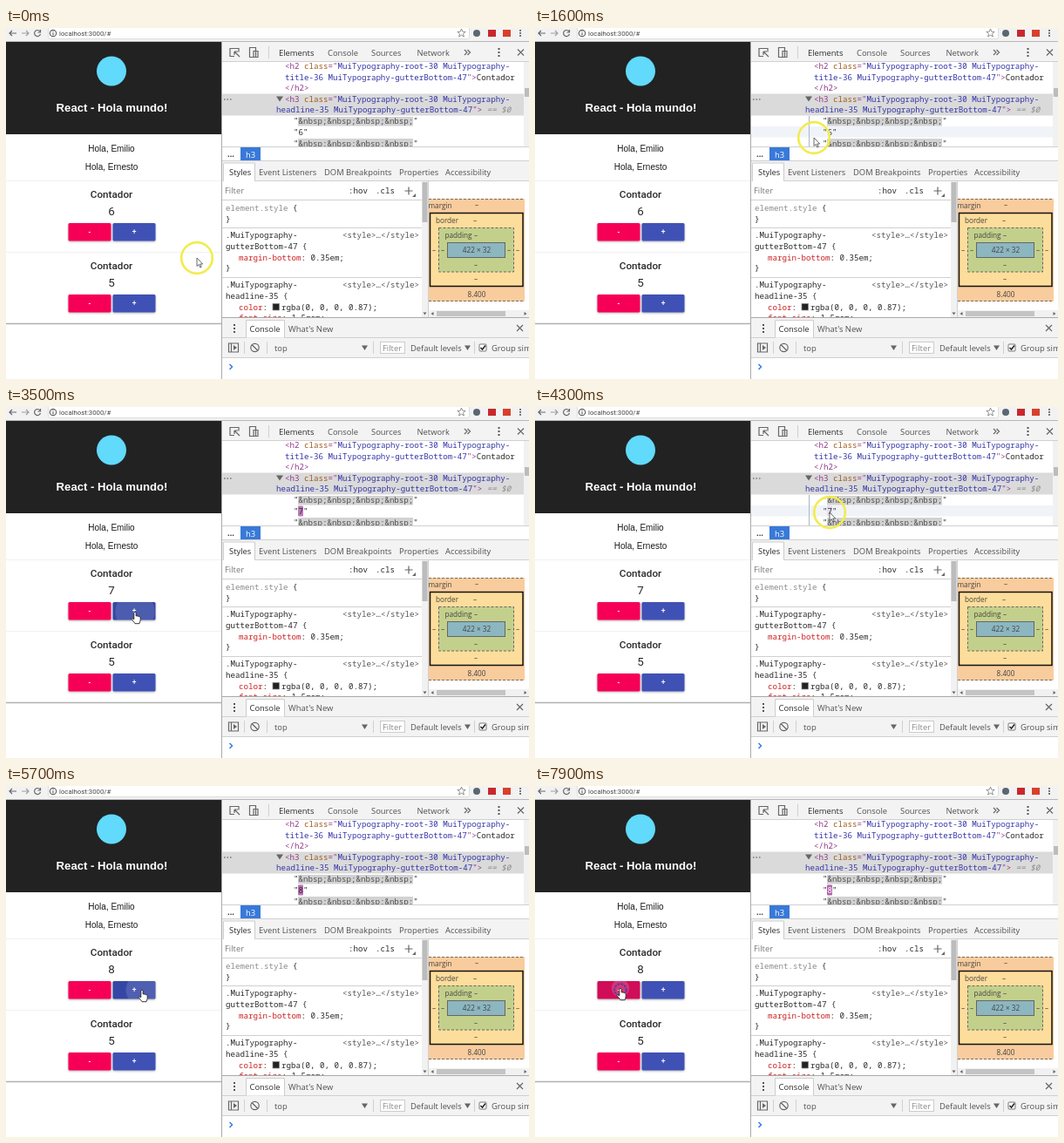
These frames come from a looping animation (600x403 px, 8 s). An HTML page:

```html
<!DOCTYPE html>
<html lang="es">
<head>
<meta charset="utf-8">
<title>Contador</title>
<style>
html, body { margin: 0; width: 100%; height: 100%; overflow: hidden; background: #fff; }
svg { display: block; width: 100vw; height: 100vh; }
text { white-space: pre; fill: #2a2a2a; }
.ui { font: 9.4px "Open Sans", "Noto Sans", sans-serif; fill: #505050; }
.on { fill: #2a2a2a; }
.bold { font-weight: 700; }
.mono { font: 9.17px "Noto Sans Mono", "DejaVu Sans Mono", monospace; }
.toggle { font-weight: 500; }
.link { fill: #555; }
.box { font: 8.2px "Open Sans", sans-serif; text-anchor: middle; fill: #444; }
.url { font: 7.8px Roboto, sans-serif; fill: #444; }
.page { text-anchor: middle; }
.title { font: bold 13.15px "Liberation Sans", Arial, sans-serif; fill: #fff; }
.body { font: 10px "Liberation Sans", Arial, sans-serif; fill: #1a1a1a; }
.head { font: 500 11.7px Roboto, sans-serif; }
.num { font: 13.4px Roboto, sans-serif; }
.btn { font: 500 8.5px Roboto, sans-serif; fill: #fff; }
.tag { fill: #93388a; } .attr { fill: #a05a1a; } .val { fill: #3535a8; }
.prop { fill: #cc2222; } .dim { fill: #8c8c8c; } .ent { fill: #505050; }
.line { stroke: #d0d0d0; fill: none; }
.icon { stroke: #666; fill: none; stroke-width: 1.2; }
</style>
</head>
<body>
<svg viewBox="0 0 600 403" preserveAspectRatio="none">
<defs>
  <filter id="shadow" x="-10%" y="-10%" width="120%" height="150%">
    <feDropShadow dx="0" dy=".8" stdDeviation=".8" flood-opacity=".35"/>
  </filter>
  <clipPath id="rules"><rect x="248" y="198" width="229" height="134"/></clipPath>
  <clipPath id="tree"><rect x="248" y="39" width="346" height="97.500"/></clipPath>
  <clipPath id="plusClip"><rect x="122.500" y="224" width="49" height="20.500" rx="1.500"/></clipPath>
  <clipPath id="minusClip"><rect x="71.500" y="224" width="49" height="20.500" rx="1.500"/></clipPath>
</defs>
<rect width="600" height="403" fill="#fff"/>

<!-- browser bar -->
<rect width="600" height="16" fill="#f2f2f2"/>
<path d="M0 15.500h600" stroke="#b8b8b8"/>
<rect x="48.500" y="-3" width="483" height="15.500" rx="2" fill="#fff" stroke="#ddd"/>
<path class="icon" d="M12 6h-8m3-3-3 3 3 3"/>
<path class="icon" d="M18 6h8m-3-3 3 3-3 3" stroke-opacity=".6"/>
<path class="icon" d="M39 4a3.500 3.500 0 1 0 .5 3M39.500 2v3h-3"/>
<circle class="icon" cx="54" cy="6" r="3.700" stroke-width=".8"/>
<path class="icon" d="M54 5.500v3M54 3.500v1"/>
<text class="url" x="61" y="9">localhost:3000/#</text>
<path d="m522.500 1 1.300 3.200 3.400.2-2.700 2.200.9 3.400-2.900-1.900-2.900 1.900.9-3.400-2.700-2.200 3.400-.2z" fill="none" stroke="#777" stroke-width=".8"/>
<circle cx="540" cy="6" r="4" fill="#5a6670"/>
<rect x="553" y="2" width="9" height="8" fill="#c8282c"/>
<rect x="570" y="2" width="9" height="8" fill="#d8402c"/>
<path d="M590 2v8" stroke="#666" stroke-width="2" stroke-dasharray="1.700 1.300"/>

<!-- web page -->
<rect y="16" width="247" height="106" fill="#222"/>
<circle cx="121" cy="49.500" r="17" fill="#61dafb"/>
<g class="page">
  <text class="title" x="121.500" y="95.500">React - Hola mundo!</text>
  <text class="body" x="121" y="141.500">Hola, Emilio</text>
  <text class="body" x="121" y="163">Hola, Ernesto</text>
  <path class="line" stroke-opacity=".3" d="M0 175.500h247M0 257.500h247"/>
  <path d="M0 339.500h247" stroke="#b0b0b0" stroke-width="1.500"/>
  <g id="cards"></g>
</g>
<path d="M247.500 16v387" stroke="#aaa"/>

<!-- developer tools -->
<rect x="248" y="16" width="352" height="23" fill="#f3f3f3"/>
<path class="line" d="M248 38.500h352M301.500 21v14"/>
<path class="icon" d="M262 32.500h-5v-9h10v4M262 27l6 6m-6-6v4m0-4h4M279.500 22.500h7v11h-7zM284 26.500h5v7h-5z"/>
<text class="ui on" x="313" y="31.500">Elements</text>
<text class="ui" x="369" y="31.500">Console</text>
<text class="ui" x="419" y="31.500">Sources</text>
<text class="ui" x="471.500" y="31.500">Network</text>
<path class="icon" d="m526 25 3 3-3 3m3.500-6 3 3-3 3M587 24.500l7 7m0-7-7 7"/>
<path d="M565.500 23v11" stroke="#555" stroke-width="2" stroke-dasharray="2 2"/>

<g clip-path="url(#tree)">
  <rect x="248" y="75.500" width="346" height="25" fill="#dadada"/>
  <rect id="hoverRow" x="248" y="113" width="346" height="12.500" fill="#f0f4f9"/>
  <path id="guide" d="M314.500 101v36" stroke="#aab7c6"/>
  <g class="mono">
    <text x="320" y="47"><tspan class="tag">&lt;h2 </tspan><tspan class="attr">class</tspan><tspan class="tag">="</tspan><tspan class="val">MuiTypography-root-30 MuiTypography-</tspan></text>
    <text x="320" y="59.500"><tspan class="val">title-36 MuiTypography-gutterBottom-47</tspan><tspan class="tag">"&gt;</tspan>Contador</text>
    <text x="320" y="72" class="tag">&lt;/h2&gt;</text>
    <text x="320" y="84.500"><tspan class="tag">&lt;h3 </tspan><tspan class="attr">class</tspan><tspan class="tag">="</tspan><tspan class="val">MuiTypography-root-30 MuiTypography-</tspan></text>
    <text x="310" y="97"><tspan class="val">headline-35 MuiTypography-gutterBottom-47</tspan><tspan class="tag">"&gt;</tspan><tspan class="dim" font-style="italic"> == $0</tspan></text>
    <rect x="335" y="102" width="132" height="10.500" fill="#d2d2d2"/>
    <rect x="335" y="127" width="132" height="10.500" fill="#d2d2d2"/>
    <text x="330" y="110">"<tspan class="ent">&amp;nbsp;&amp;nbsp;&amp;nbsp;&amp;nbsp;</tspan>"</text>
    <rect id="flash" x="335" y="113.500" width="6" height="12" rx="1" fill="#9e3699"/>
    <text x="330" y="123">"<tspan id="node"></tspan>"</text>
    <text x="330" y="135.500">"<tspan class="ent">&amp;nbsp;&amp;nbsp;&amp;nbsp;&amp;nbsp;</tspan>"</text>
  </g>
  <path d="M310 78.500h8l-4 6z" fill="#666"/>
  <path d="M250 82h9" stroke="#777" stroke-width="1.500" stroke-dasharray="1.500 2"/>
</g>
<rect x="594" y="39" width="6" height="97" fill="#f1f1f1"/>
<rect x="595" y="69" width="5" height="10" fill="#bcbcbc"/>
<path class="line" d="M248 136.500h352M248 152.500h352"/>
<text class="ui on bold" x="254" y="148">...</text>
<rect x="269" y="137" width="23" height="15" fill="#3879d9"/>
<text class="ui" x="275" y="148.500" style="fill:#fff">h3</text>

<rect x="248" y="153" width="352" height="23" fill="#f3f3f3"/>
<path d="M249.500 176v-21h36v21" fill="#fff" stroke="#ccc"/>
<path class="line" d="M285 175.500h315M248 197.500h229"/>
<text class="ui on" x="256" y="169">Styles</text>
<text class="ui" x="290" y="169">Event Listeners</text>
<text class="ui" x="365" y="169">DOM Breakpoints</text>
<text class="ui" x="451" y="169">Properties</text>
<text class="ui" x="504" y="169">Accessibility</text>
<text class="ui" x="251" y="190" style="fill:#777">Filter</text>
<text class="mono toggle" x="393" y="190">:hov</text>
<text class="mono toggle" x="424" y="190">.cls</text>
<path class="icon" d="M457.500 187h9m-4.500-4.500v9"/>
<path d="M470 190v4h-4z" fill="#666"/>
<rect x="477" y="176" width="7.500" height="156" fill="#f1f1f1"/>
<rect x="477.500" y="177" width="6" height="46" fill="#bcbcbc"/>
<path d="M478.500 326.500h4l-2 3z" fill="#666"/>
<g clip-path="url(#rules)" class="mono">
  <path class="line" d="M248 229.500h229M248 286.500h229"/>
  <text x="252" y="209.500"><tspan class="dim">element.style</tspan> {</text>
  <text x="252" y="222.500">}</text>
  <text x="252" y="241">.MuiTypography-</text>
  <text class="link" x="386" y="241">&lt;style&gt;…&lt;/style&gt;</text>
  <text x="252" y="253.500">gutterBottom-47 {</text>
  <text x="267" y="267"><tspan class="prop">margin-bottom</tspan>: 0.35em;</text>
  <text x="252" y="279">}</text>
  <text x="252" y="298">.MuiTypography-</text>
  <text class="link" x="386" y="298">&lt;style&gt;…&lt;/style&gt;</text>
  <text x="252" y="310.500">headline-35 {</text>
  <text x="267" y="324"><tspan class="prop">color</tspan>:</text>
  <rect x="306" y="316.500" width="7.500" height="7.500" fill="#222" stroke="#888" stroke-width=".7"/>
  <text x="316" y="324">rgba(0, 0, 0, 0.87);</text>
  <text x="267" y="335.500"><tspan class="prop">font-size</tspan>: 1.5rem;</text>
</g>
<path class="line" d="M484.500 176v156"/>

<!-- box model -->
<rect x="485" y="196" width="110" height="118" fill="#f9cc9d"/>
<path d="M485 196.500h110M485 313.500h110" stroke="#555" stroke-width=".8" stroke-dasharray="3 2"/>
<rect x="486.500" y="212.500" width="106.500" height="84" fill="#fddd9b" stroke="#111" stroke-width="1.500"/>
<rect x="496.500" y="229.500" width="86" height="50.500" fill="#c3d08b" stroke="#666" stroke-dasharray="3 2"/>
<rect x="506.500" y="246.500" width="66" height="17" fill="#8cb6c0" stroke="#666"/>
<g id="boxText">
  <text class="box" x="498" y="207">margin</text>
  <text class="box" x="506" y="224">border</text>
  <text class="box" x="519" y="241">padding</text>
  <text class="box" x="540" y="258">422 × 32</text>
  <text class="box" x="540" y="308.500">8.400</text>
</g>
<rect x="485" y="324" width="115" height="8" fill="#f1f1f1"/>
<rect x="494" y="325" width="79" height="6" fill="#c4c4c4"/>
<path d="M490.500 326v4l-3-2zM594.500 326v4l3-2z" fill="#666"/>

<!-- drawer -->
<rect x="248" y="332" width="352" height="46" fill="#f3f3f3"/>
<path d="M248 332.500h352" stroke="#aaa"/>
<path class="line" d="M248 355.500h352M248 378.500h352M273.500 360v14M299.500 360v14M421.500 360v14M537.500 360v14"/>
<path d="M275.500 355.500v-20h44v20" fill="#fff" stroke="#ccc"/>
<path d="M262 340v11" stroke="#555" stroke-width="2" stroke-dasharray="2 2"/>
<text class="ui on" x="279.500" y="349">Console</text>
<text class="ui" x="324" y="349">What's New</text>
<path class="icon" d="m586 341 7 7m0-7-7 7"/>
<path class="icon" d="M255.500 362h11v10h-11zM258.500 362v10"/>
<path d="m261 364 4 3-4 3z" fill="#666"/>
<circle class="icon" cx="285.500" cy="367" r="4.700"/>
<path class="icon" d="m282 363.500 7 7"/>
<text class="ui" x="308" y="370.500">top</text>
<path d="M408 364.500h7l-3.500 5.500zM526 364.500h7l-3.500 5.500z" fill="#666"/>
<rect x="429.500" y="360.500" width="28" height="13" fill="#fff" stroke="#ccc"/>
<text class="ui" x="432" y="370.500" style="fill:#888">Filter</text>
<text class="ui" x="464" y="370.500">Default levels</text>
<rect x="543" y="363" width="8" height="8" rx="1" fill="#fff" stroke="#777"/>
<path d="m544.500 367 2 2 3.500-4.500" fill="none" stroke="#222" stroke-width="1.500"/>
<text class="ui" x="557" y="370.500">Group similar</text>
<path d="m256.500 386 3 3-3 3" fill="none" stroke="#367cf1" stroke-width="1.500"/>

<!-- pointer -->
<g id="pointer">
  <circle id="halo" r="17.800" fill="none" stroke="#f2ec50" stroke-width="2.700"/>
  <circle id="press" cy="2" fill="none" stroke="#5a3ca8" stroke-width="2" stroke-dasharray="3 1"/>
  <path id="arrow" d="M0 0v9.500l2.200-2 1.600 3.500 1.500-.7-1.600-3.300h3z" fill="#fff" stroke="#444" stroke-width=".8"/>
  <path id="beam" d="M-2-4.500h1.500l.5.500.5-.5h1.500M0-4v8M-2 4.500h1.500l.5-.5.5.5h1.500" fill="none" stroke="#333"/>
  <path id="hand" d="M-1.200 1q1.200-2 2.400 0v4q1-.8 1.800.3 1-.6 1.700.4 1.300-.5 1.500 1v3q-.3 2-1.200 4h-5q-1-2-4-5 0-2 2.800 0z" fill="#fff" stroke="#222" stroke-width=".9"/>
</g>
</svg>
<script>
const LOOP = 8000, STEP = 100;
const $ = id => document.getElementById(id);
const set = (el, attrs) => { for (const k in attrs) el.setAttribute(k, attrs[k]); };
const show = (id, on) => set($(id), { visibility: on ? 'visible' : 'hidden' });

const button = (id, x, y, fill, label) =>
  `<rect id="${id}" x="${x}" y="${y}" width="49" height="20.5" rx="1.5" fill="${fill}" filter="url(#shadow)"/>
   <g clip-path="url(#${id}Clip)"><circle id="${id}Wave" fill="#fff" opacity="0"/></g>
   <text class="btn" x="${x + 24.5}" y="${y + 13}">${label}</text>`;
const card = (id, y, count) =>
  `<text class="head" x="121" y="${y}">Contador</text>
   <text class="num" id="count${id}" x="121" y="${y + 20}">${count}</text>
   ${button('minus' + id, 71.5, y + 29, '#f50057', '-')}
   ${button('plus' + id, 122.5, y + 29, '#3f51b5', '+')}`;
$('cards').innerHTML = card('', 195, 6) + card('2', 277, 5);

const dashes = [[540, 206], [538, 224], [539, 241], [539, 275], [539, 291], [491, 258], [501, 258], [577, 258], [587, 258]];
$('boxText').innerHTML += dashes.map(([x, y]) => `<text class="box" x="${x}" y="${y}">–</text>`).join('');

// time, x, y of the pointer tip
const path = [
  [0, 219, 264], [300, 222, 258], [1100, 328, 121], [1600, 320, 126], [1900, 318, 127],
  [2600, 133, 262], [3000, 148, 235], [3600, 148, 235], [4150, 338, 121], [4700, 338, 121],
  [5300, 156, 234], [6250, 156, 234], [6700, 111, 282], [7300, 98, 232], [8000, 98, 232]
];
// time and change of the counter
const clicks = [[3300, 1], [5550, 1], [6050, 1], [7850, -1]];

const ease = u => u * u * (3 - 2 * u);
function tip(t) {
  const i = path.findIndex(p => p[0] > t);
  const [a, b] = [path[i - 1], path[i]];
  const u = ease((t - a[0]) / (b[0] - a[0]));
  return [a[1] + (b[1] - a[1]) * u, a[2] + (b[2] - a[2]) * u];
}
const within = (x, y, l, t, r, b) => x >= l && x <= r && y >= t && y <= b;

function draw(t) {
  const [x, y] = tip(t);
  const done = clicks.filter(c => c[0] <= t);
  const count = done.reduce((n, c) => n + c[1], 6);
  const last = done[done.length - 1] || [-LOOP, 0];
  const age = t - last[0];

  $('count').textContent = count;
  $('node').textContent = count;
  set($('node'), { fill: age < 120 ? '#fff' : '#2a2a2a' });
  set($('flash'), { opacity: Math.max(0, 0.8 * (1 - age / 1200)) });

  const onMinus = within(x, y, 71, 224, 121, 245);
  const onPlus = within(x, y, 122, 224, 172, 245);
  const onText = within(x, y, 97, 267, 145, 300) || within(x, y, 97, 185, 145, 217);
  const onHand = onMinus || onPlus;
  const onRow = within(x, y, 248, 113, 594, 129);
  set($('minus'), { fill: onMinus ? '#d00f58' : '#f50057' });
  set($('plus'), { fill: onPlus ? '#3646a5' : '#3f51b5' });
  for (const [id, dir] of [['plus', 1], ['minus', -1]]) {
    const active = last[1] === dir && age < 550;
    set($(id + 'Wave'), {
      cx: x, cy: y, r: active ? 6 + age / 12 : 0,
      opacity: active ? 0.18 * (1 - age / 550) : 0
    });
  }
  show('hoverRow', onRow);
  show('guide', onRow);

  set($('pointer'), { transform: `translate(${x.toFixed(2)} ${y.toFixed(2)})` });
  show('hand', onHand);
  show('beam', onText);
  show('arrow', !onHand && !onText);
  show('halo', age >= 250);
  show('press', age < 120);
  set($('press'), { r: Math.max(3, 8 - age / 40) });
}

const start = performance.now();
function tick() {
  const t = (performance.now() - start) % LOOP;
  draw(Math.floor(t / STEP) * STEP);
  requestAnimationFrame(tick);
}
tick();
</script>
</body>
</html>
```
